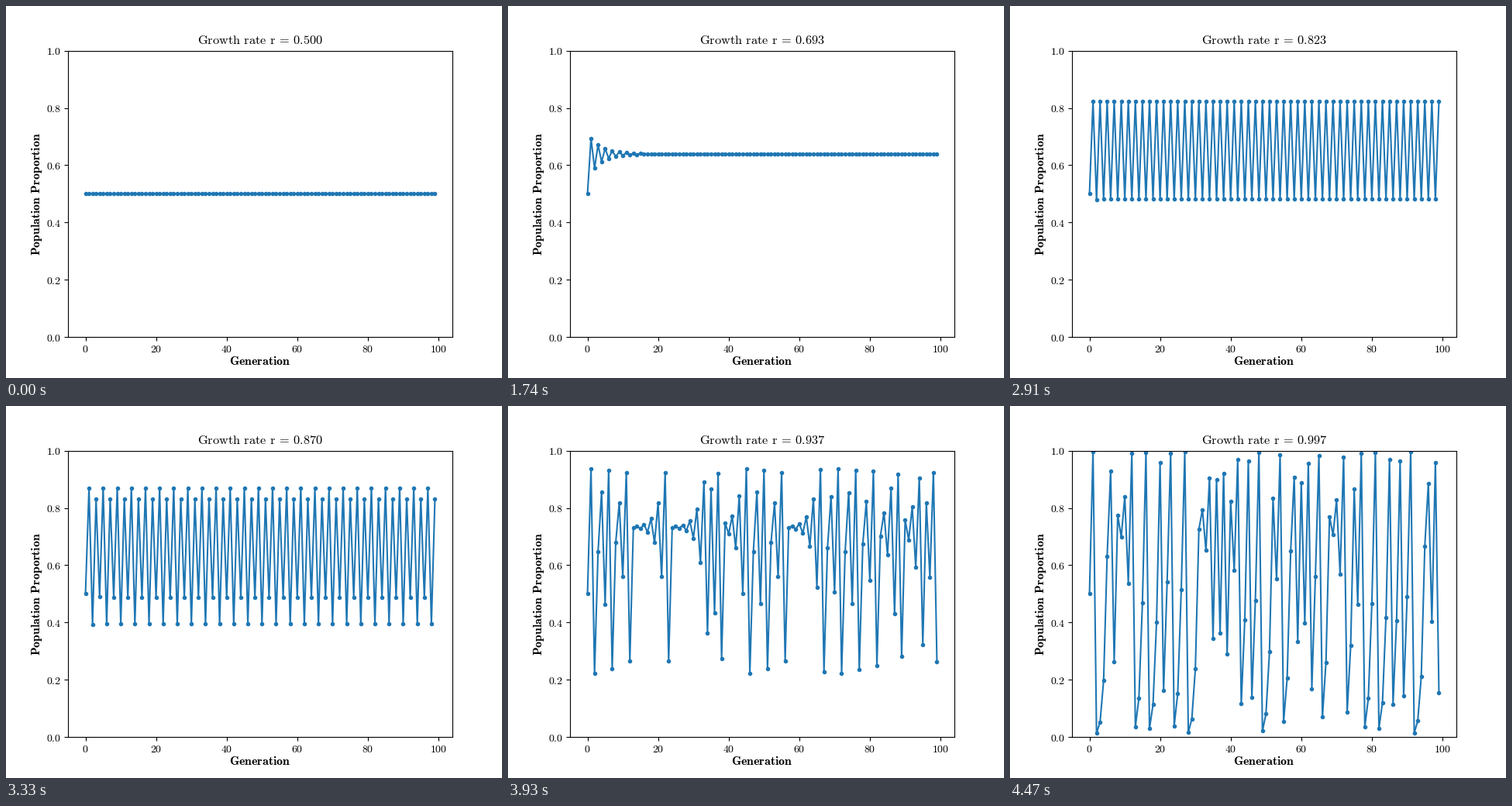
A matplotlib script that plays this animation: 640x480 px, repeating every 4.5 s.

```python
import matplotlib.pyplot as plt
import numpy as np
from matplotlib.animation import FuncAnimation

plt.rcParams["mathtext.fontset"] = "cm"

WIDTH, HEIGHT, DPI = 640, 480, 100
FRAMES = 150
INTERVAL = 30
GENERATIONS = 100
SPACE = r"\hspace{0.38}"
THIN = r"\hspace{0.18}"  # mathtext pads the equals sign itself

rates = np.linspace(0.5, 1, FRAMES, endpoint=False)


def styled(style, text):
    return rf"$\{style}{{{text.replace(' ', SPACE)}}}$"


def title_text(rate):
    return styled("mathrm", f"Growth rate r{THIN}={THIN}{rate:.3f}")


def population(rate, start=0.5):
    """Logistic map, each generation stored in single precision."""
    values = np.empty(GENERATIONS, dtype=np.float32)
    values[0] = start
    for n in range(1, GENERATIONS):
        x = float(values[n - 1])
        values[n] = 4 * rate * x * (1 - x)
    return values


def axis_label(x, y, text, rotation=0):
    fig.text(x / WIDTH, 1 - y / HEIGHT, styled("mathbf", text), fontsize=11.4,
             ha="center", va="baseline", rotation=rotation,
             rotation_mode="anchor")


fig, ax = plt.subplots(figsize=(WIDTH / DPI, HEIGHT / DPI), dpi=DPI)
line, = ax.plot(range(GENERATIONS), population(rates[0]), ".-", color="#1f77b4")

xticks = range(0, 101, 20)
yticks = np.linspace(0, 1, 6)
ax.set_xticks(xticks, [styled("mathrm", str(t)) for t in xticks])
ax.set_yticks(yticks, [styled("mathrm", f"{t:.1f}") for t in yticks])
ax.tick_params(axis="x", pad=3)
ax.tick_params(axis="y", pad=2.8)
ax.set_xlim(-4.95, 103.95)
ax.set_ylim(0, 1)

axis_label(328, 463, "Generation")
axis_label(44.3, 242.4, "Population Proportion", rotation=90)
title = ax.set_title(title_text(rates[0]), fontsize=11.75)


def update(i):
    line.set_ydata(population(rates[i]))
    title.set_text(title_text(rates[i]))
    return line, title


anim = FuncAnimation(fig, update, frames=FRAMES, interval=INTERVAL,
                     repeat=True, repeat_delay=0)
plt.show()
```
